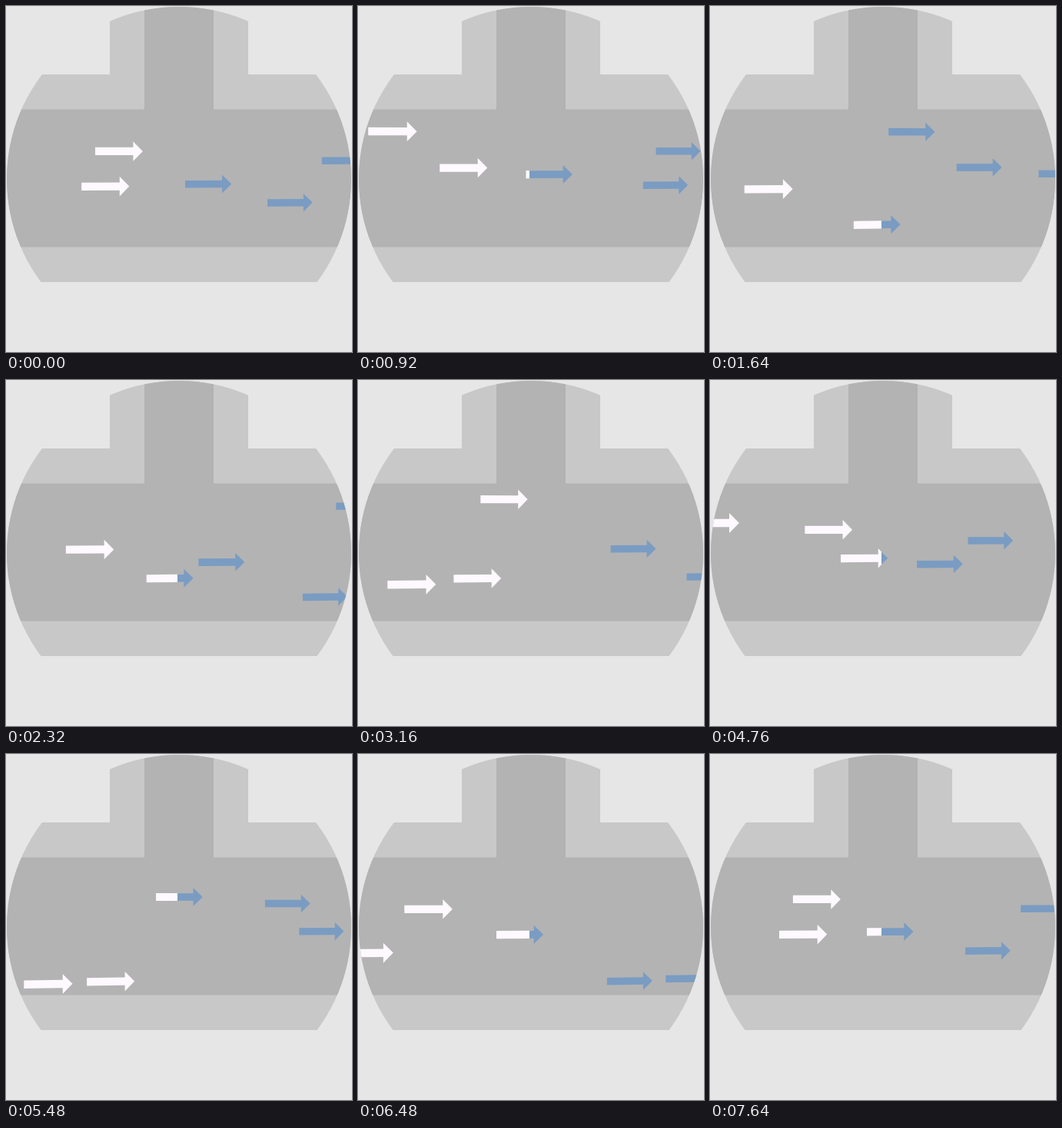
Recreate the animation shown at these times as an HTML page with a canvas. Size 450 px wide and 450 px high, loop 7.68 s.

```html
<!DOCTYPE html>
<html>
<head>
<meta charset="utf-8">
<style>
  html, body { margin: 0; width: 100%; height: 100%; overflow: hidden; background: #e6e6e6; }
  canvas { display: block; }
</style>
</head>
<body>
<canvas id="stage" width="450" height="450"></canvas>
<script>
const ctx = document.getElementById('stage').getContext('2d');
const LOOP = 7680, STEP = 40;
const INTERVAL = 1000 / 3;  // one arrow is released per interval
const FIRST = -5;           // arrows already under way at the start
const SPEED = 0.313;        // px per ms at the left edge
const SHRINK = 0.000115;    // perspective towards the right
const HORIZON = 185;
const SPLIT = 223;          // arrows turn blue here

// [how far behind the left edge it is released, in ms; height below the horizon]
const arrows = [
  [289, 17], [203, 74], [235, 48], [291, 4], [16, 50.5],
  [204, 35], [243, 26], [211, -22], [30, 102], [163, 53.7], [57, 74.8],
  [69, 36], [308, -30.5], [90, 74.5], [37, 81.6], [312, 25], [206, 56.5],
  [206, 48], [27, 10], [176, 1], [140, 112.7], [72, 115], [226, 51.2],
  [286, 17], [204, 74], [306, 47.5], [291, 4], [16, 50.5]
];
const outline = [[0, -5.2], [51, -5.2], [51, -13], [64, 0], [51, 13], [51, 5.2], [0, 5.2]];

function rect(color, x, y, w, h) {
  ctx.fillStyle = color;
  ctx.fillRect(x, y, w, h);
}

function drawArrow(u, y, thickness) {
  ctx.beginPath();
  for (const [du, dy] of outline) {
    const s = 1 / (1 + SHRINK * (u + du));
    ctx.lineTo((u + du) * s, HORIZON + (y + dy * thickness) * s);
  }
  ctx.fill();
}

function drawFlow(t, color, left, right, thickness) {
  ctx.save();
  ctx.beginPath();
  ctx.rect(left, 0, right - left, 450);
  ctx.clip();
  ctx.fillStyle = color;
  arrows.forEach(([delay, y], i) => {
    const age = t - (i + FIRST) * INTERVAL;
    if (age >= 0) drawArrow((age - delay) * SPEED, y, thickness);
  });
  ctx.restore();
}

function draw(t) {
  rect('#e6e6e6', 0, 0, 450, 450);
  ctx.save();
  ctx.beginPath();
  ctx.arc(225, 225, 224, 0, Math.PI * 2);
  ctx.clip();
  rect('#c8c8c8', 0, 89, 450, 270);
  rect('#c8c8c8', 135, 0, 180, 135);
  rect('#b3b3b3', 0, 134.5, 450, 179);
  rect('#b3b3b3', 180, 0, 90, 136);
  drawFlow(t, '#fef9fe', 0, SPLIT, 1);
  drawFlow(t, '#7a9cc2', SPLIT, 450, 0.95);
  ctx.restore();
}

const start = performance.now();
function tick() {
  const t = (performance.now() - start) % LOOP;
  draw(Math.floor(t / STEP) * STEP);
  requestAnimationFrame(tick);
}
tick();
</script>
</body>
</html>
```
